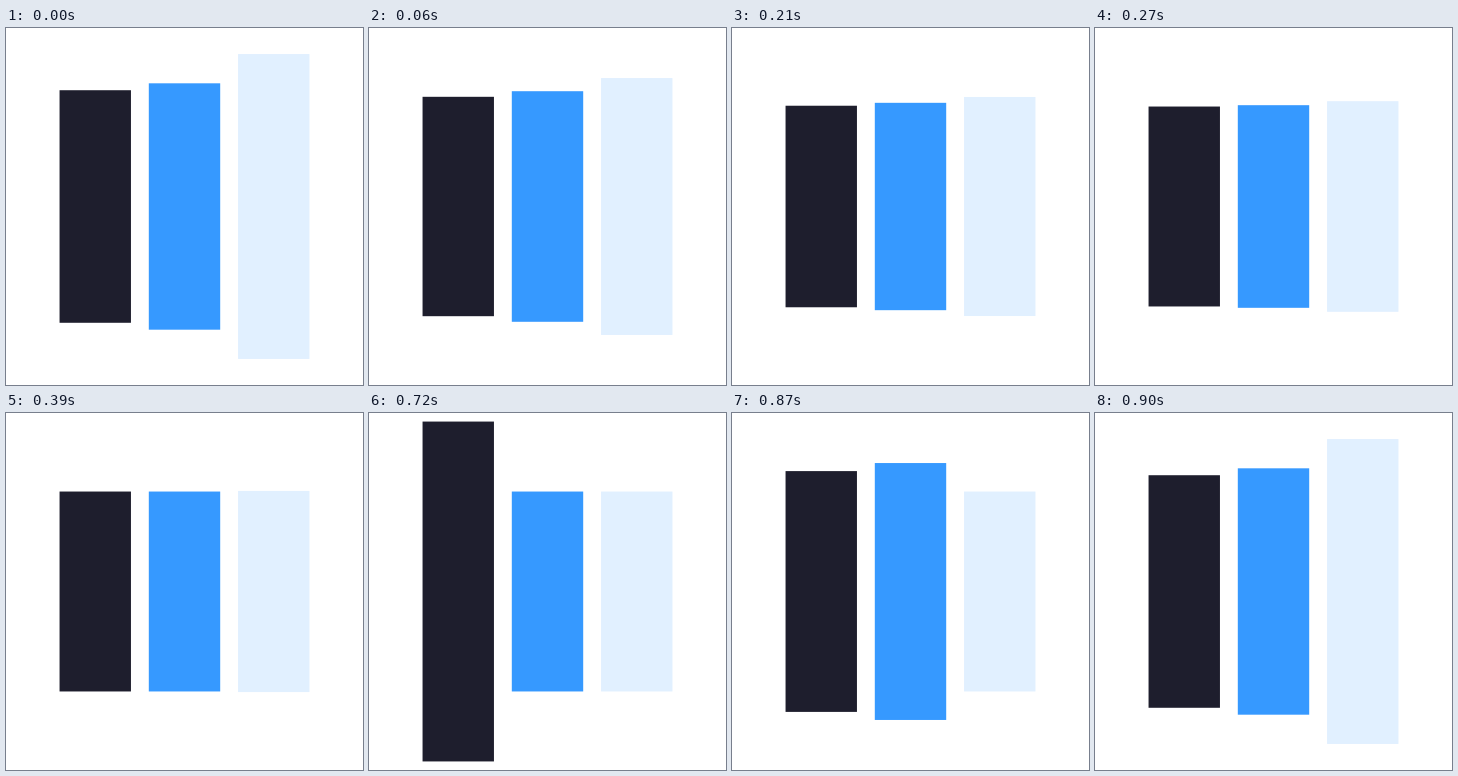
Animation, 357 px wide and 357 px high, one loop 0.93 s. Source, as an HTML page without scripts:

```html
<!DOCTYPE html>
<html lang="en">
<head>
<meta charset="utf-8">
<title>Pulsing bars</title>
<style>
  @property --tick {
    syntax: "<integer>";
    inherits: true;
    initial-value: 0;
  }

  html, body {
    margin: 0;
    width: 100%;
    height: 100%;
    overflow: hidden;
    background: #fff;
  }

  svg {
    display: block;
    width: 100%;
    height: 100%;
    /* 31 ticks of 30 ms; the small lead keeps samples off tick edges */
    animation: ticks 930ms steps(31, end) -1ms infinite;
  }

  @keyframes ticks {
    from { --tick: 0; }
    to { --tick: 31; }
  }

  /* Each bar jumps tall, then shrinks over 15 ticks along
     cubic-bezier(0, .5, .5, 1), solved here in closed form. */
  rect {
    --age: calc(var(--tick) + var(--lead));
    --since: calc(var(--age) - 30 * clamp(0, var(--age) - var(--last), 1));
    --time: clamp(0, var(--since) / 15, 1);
    --s: calc(1 + 2 * cos((360deg - acos(1 - var(--time))) / 3));
    --eased: calc(1.5 * var(--s) - 0.5 * var(--s) * var(--s) * var(--s));
    --top: calc(var(--tall) + (22 - var(--tall)) * var(--eased));
    y: calc(1px * var(--top));
    height: calc(100px - 2px * var(--top));
    width: 20px;
  }

  /* lead: ticks since the jump at load; last: final age before wrapping */
  .dark  { --lead: 6; --last: 29; --tall: 2.4; x: 15px; fill: #1e1e2d; }
  .blue  { --lead: 3; --last: 30; --tall: 7.3; x: 40px; fill: #3699ff; }
  .light { --lead: 0; --last: 29; --tall: 7.3; x: 65px; fill: #e1f0ff; }
</style>
</head>
<body>
<svg viewBox="0 0 100 100" aria-label="Loading">
  <rect class="dark"/>
  <rect class="blue"/>
  <rect class="light"/>
</svg>
</body>
</html>
```
